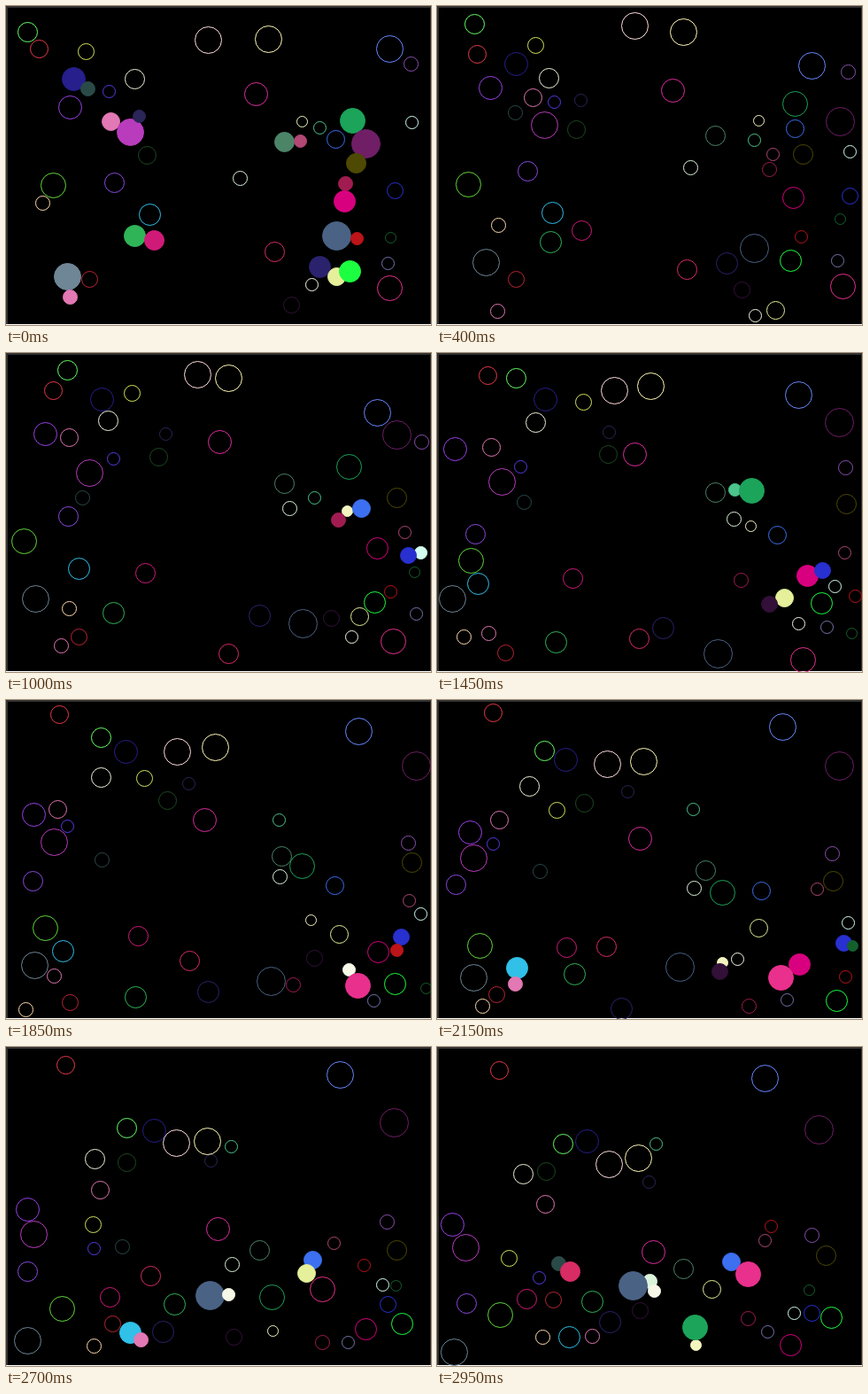
Write an HTML page with a canvas that moves like this. It is 480x360 px and loops after 3 s.

```html
<!DOCTYPE html>
<html lang="en">
<head>
<meta charset="utf-8">
<title>Colliding balls</title>
<style>
html, body { margin: 0; width: 100%; height: 100%; overflow: hidden; background: #000; }
canvas { display: block; }
</style>
</head>
<body>
<canvas id="stage" width="480" height="360"></canvas>
<script>
const WIDTH = 480, HEIGHT = 360;
const STEP = 50, STEPS = 60;
const GRAVITY = 0.1, TOUCH = 0.4;
const ctx = document.getElementById('stage').getContext('2d');
const balls = [];

// Starting state: place in pixels, velocity in pixels per step.
function ball(color, r, x, y, vx, vy) {
  balls.push({ color, r, x, y, vx, vy, mass: r * r, lit: false });
}

// upper left
ball('#66ff66', 11, 24, 29, 2.25, -1.5);
ball('#e83c48', 10, 37, 48, 1, 0.35);
ball('#d2e05a', 9, 90, 51, 2.6, -1.3);
ball('#261f8c', 13, 76, 82, 1.6, -2.5);
ball('#2a4a48', 8, 92, 93, -0.5, 3);
ball('#5a3ae6', 7, 116, 96, 1.9, 1.2);
ball('#f0f0dc', 11, 145, 82, -2.4, -0.5);
ball('#9a42e8', 13, 72, 114, -1.5, -3.15);
ball('#e278b4', 10, 118, 130, -1, -3.65);
ball('#b83cbc', 15, 140, 142, -2.4, -1.4);
ball('#2a2658', 7, 150, 124, 1.5, -2.65);
ball('#1c4a22', 10, 159, 168, -0.25, -4);

// lower left
ball('#62d83c', 14, 53, 202, -2.25, -0.5);
ball('#ffdcae', 8, 41, 222, 3.5, 2.7);
ball('#8a4ae0', 11, 122, 199, -2.5, -2);
ball('#30c0e8', 12, 162, 235, -4, -0.6);
ball('#30b458', 12, 145, 259, -2.1, 0.5);
ball('#d01a78', 11, 167, 264, -0.5, -1.8);
ball('#6e8696', 15, 69, 305, -1.8, -2.4);
ball('#b82434', 9, 94, 308, -0.6, -0.4);
ball('#e278b4', 8, 72, 328, -0.5, 1.6);

// middle
ball('#ffdcdc', 15, 228, 38, -0.6, -2.4);
ball('#fff8b4', 15, 296, 37, -2.25, -1.45);
ball('#e02ca0', 13, 282, 99, -2.05, -0.95);
ball('#dcf4dc', 8, 264, 194, 2.8, -1.95);
ball('#d82c64', 11, 303, 277, -2.6, 2.1);

// upper right
ball('#6888ff', 15, 433, 48, -1.25, 2);
ball('#8a50b0', 8, 457, 65, 0.9, 0.75);
ball('#f4f4c0', 6, 334, 130, 3.6, -0.5);
ball('#4cc48c', 7, 354, 137, 0.5, 1.35);
ball('#3c70f0', 10, 372, 150, 4, -1.9);
ball('#1ca45a', 14, 391, 129, 1.6, -2.8);
ball('#701e66', 16, 406, 155, 6.1, -3.5);
ball('#4e4a04', 11, 395, 177, 2.3, -1.7);
ball('#d4fff0', 7, 458, 131, 1, 3.7);
ball('#4c8468', 11, 314, 153, 0, -1.3);
ball('#b24874', 7, 332, 152, 5.9, 1.5);

// lower right
ball('#a01c50', 8, 383, 200, -1, -2.4);
ball('#d8007e', 12, 382, 220, 2.5, -0.9);
ball('#2830d0', 9, 439, 208, 3.4, 0.35);
ball('#4a6284', 16, 373, 259, -1.9, 1.35);
ball('#bc1418', 7, 396, 262, 1.9, -0.65);
ball('#14602c', 6, 434, 261, 2.6, -3);
ball('#2a226c', 12, 354, 294, -3.4, -0.9);
ball('#e6f09a', 10, 373, 305, 1.1, 4.35);
ball('#1cff40', 12, 388, 299, 1.4, -1.9);
ball('#f8f8e8', 7, 345, 314, 1.25, 3.85);
ball('#7674ac', 7, 431, 290, 2.6, -0.8);
ball('#e8308c', 14, 433, 318, 3.1, -0.65);
ball('#321038', 9, 322, 337, 3, -2.5);

// Light up a touching pair and, if it is closing in, bounce it elastically.
function collide(a, b) {
  const dx = b.x - a.x, dy = b.y - a.y, gap = Math.hypot(dx, dy);
  if (gap >= a.r + b.r + TOUCH) return;
  a.lit = b.lit = true;
  const nx = dx / gap, ny = dy / gap;
  const closing = (a.vx - b.vx) * nx + (a.vy - b.vy) * ny;
  if (closing <= 0) return;
  const push = 2 * closing / (a.mass + b.mass);
  a.vx -= push * b.mass * nx;
  a.vy -= push * b.mass * ny;
  b.vx += push * a.mass * nx;
  b.vy += push * a.mass * ny;
}

function bounce(b, axis, speed, size) {
  const low = b.r, high = size - b.r;
  if (b[axis] < low) {
    b[axis] = 2 * low - b[axis];
    b[speed] = Math.abs(b[speed]);
  } else if (b[axis] > high) {
    b[axis] = 2 * high - b[axis];
    b[speed] = -Math.abs(b[speed]);
  }
}

function move(b) {
  b.x += b.vx;
  b.y += b.vy + GRAVITY / 2;
  b.vy += GRAVITY;
  bounce(b, 'x', 'vx', WIDTH);
  bounce(b, 'y', 'vy', HEIGHT);
}

// Work out the whole loop once, so drawing depends on the time alone.
const poses = Array.from({ length: STEPS }, () => {
  balls.forEach(b => { b.lit = false; });
  balls.forEach((a, i) => balls.slice(i + 1).forEach(b => collide(a, b)));
  const pose = balls.map(b => ({ ...b }));
  balls.forEach(move);
  return pose;
});

function draw(pose) {
  ctx.fillStyle = '#000';
  ctx.fillRect(0, 0, WIDTH, HEIGHT);
  ctx.strokeStyle = '#333';
  ctx.lineWidth = 2;
  ctx.strokeRect(1, 1, WIDTH - 1, HEIGHT);
  ctx.fillStyle = '#fff';
  ctx.fillRect(0, HEIGHT - 1, WIDTH, 1);

  ctx.lineWidth = 1;
  for (const { color, r, x, y, lit } of pose) {
    ctx.beginPath();
    ctx.arc(Math.round(x) + 0.5, Math.round(y) + 0.5, r, 0, Math.PI * 2);
    ctx.strokeStyle = ctx.fillStyle = color;
    if (lit) ctx.fill();
    ctx.stroke();
  }
}

const start = performance.now();
function tick() {
  draw(poses[Math.floor((performance.now() - start) / STEP) % STEPS]);
  requestAnimationFrame(tick);
}
tick();
</script>
</body>
</html>
```
